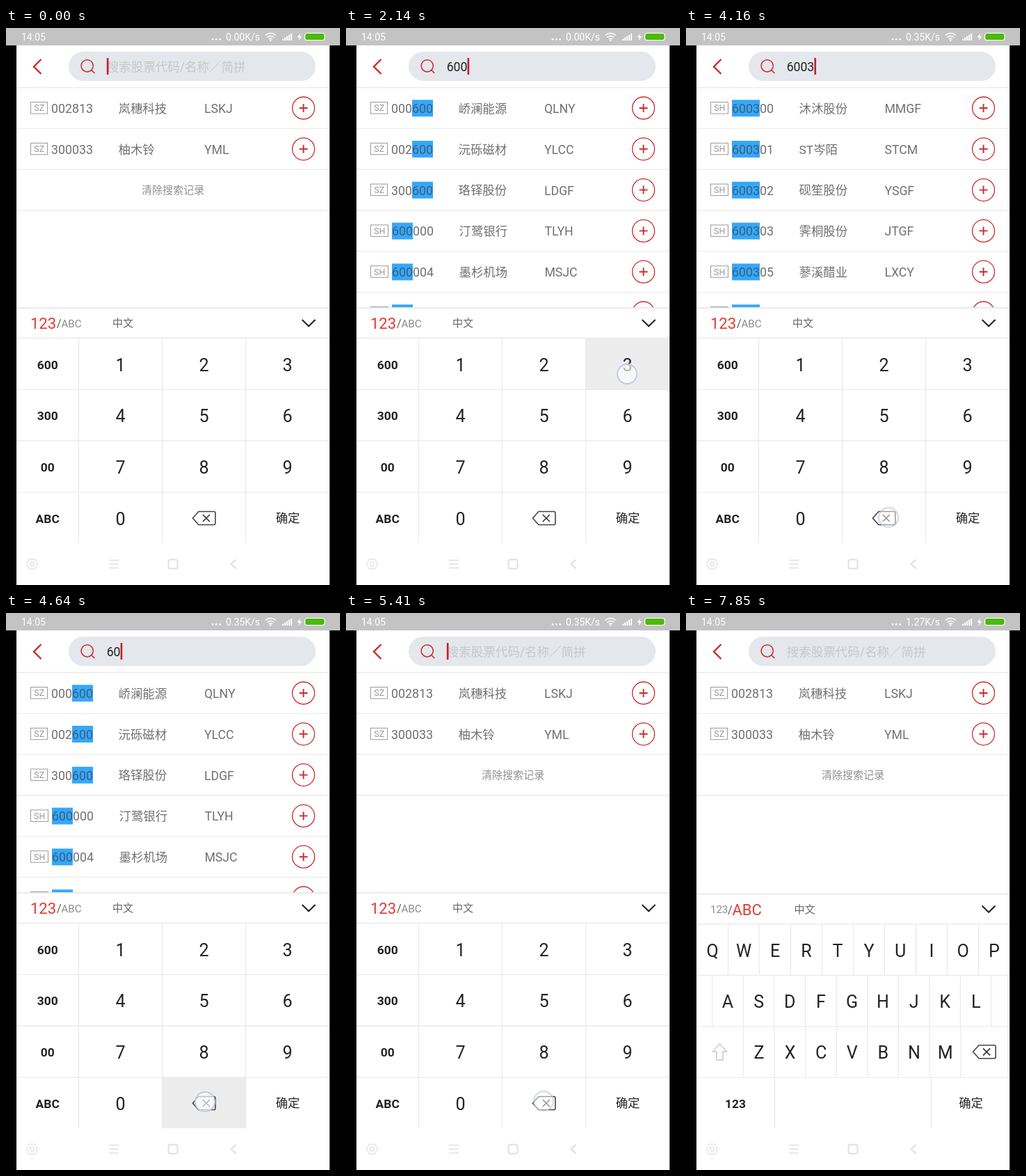
An HTML page for the animation above (8000 ms loop, 480 by 800 pixels).

```html
<!DOCTYPE html>
<html lang="zh-CN">
<head>
<meta charset="utf-8">
<title>Stock search keyboard</title>
<style>
  html, body { margin: 0; width: 100%; height: 100%; overflow: hidden; background: #000; }
  svg { display: block; width: 480px; height: 800px; font-family: Roboto, "Noto Sans CJK SC", "Noto Sans CJK", sans-serif; }
</style>
</head>
<body>
<svg id="stage" viewBox="0 0 480 800"></svg>
<script>
const LOOP = 8000, RED = '#cb2b2b', ROW = 58.8;

// x, vertical centre, string, size, colour, anchor, weight
const text = (x, y, s, size, fill = '#222', anchor = 'middle', weight = 400, id = '') =>
  `<text ${id && `id="${id}"`} x="${x}" y="${y + size * 0.36}" font-size="${size}" fill="${fill}" text-anchor="${anchor}" font-weight="${weight}">${s}</text>`;
const rect = (x, y, w, h, fill, extra = '') =>
  `<rect x="${x}" y="${y}" width="${w}" height="${h}" fill="${fill}" ${extra}/>`;
const path = (d, stroke, width = 1.5, fill = 'none') =>
  `<path d="${d}" stroke="${stroke}" stroke-width="${width}" fill="${fill}"/>`;
const ring = (x, y, r, stroke, width = 1.5, fill = 'none') =>
  `<circle cx="${x}" cy="${y}" r="${r}" stroke="${stroke}" stroke-width="${width}" fill="${fill}"/>`;
const group = (id, body) => `<g id="${id}">${body}</g>`;
const hline = (y, w = 1.3) => path(`M15 ${y}H465`, '#ebebeb', w);
const vlines = (xs, y, h) => xs.map(x => path(`M${x} ${y}v${h}`, '#ebebeb', 1.3)).join('');
const steps = (n, start, gap) => Array.from({ length: n }, (_, i) => start + i * gap);

function stockRow([market, code, name, abbr], i, query) {
  const y = 115.2 + i * ROW, sh = market === 'SH' ? 1 : 0, x = 65 + sh;
  const at = query ? code.indexOf(query) : -1;
  const mark = at < 0 ? '' : rect(x + at * 10, y - 12, query.length * 10, 24, '#35a8fa');
  const digits = at < 0 ? code :
    `${code.slice(0, at)}<tspan fill="#3f5f78">${query}</tspan>${code.slice(at + query.length)}`;
  return rect(35.5, y - 8.7, 24 + sh, 16.5, 'none', 'stroke="#999"') +
    text(47.7 + sh / 2, y - 0.3, market, 12.5, '#999') + mark +
    text(x, y + 0.4, digits, 17.8, '#707070', 'start') +
    text(161.5 + sh, y + 0.4, name, 17.4, '#707070', 'start') +
    text(285 + sh / 2, y + 0.4, abbr, 17.6, '#707070', 'start') +
    ring(427.5, y - 0.2, 16, RED, 1.3) +
    path(`M421.5 ${y - 0.2}h12m-6 -6v12`, RED, 1.9) + hline(y + 29.2);
}
const stockList = (id, query, rows) => group(id, rows.map((r, i) => stockRow(r, i, query)).join(''));

const eraseIcon = (x, y) =>
  path(`M${x - 16.5} ${y}l8.5 -9.5h22q2 0 2 2v15q0 2 -2 2h-22z`, '#444', 1.6) +
  path(`M${x - 2} ${y - 5}l10 10m0 -10l-10 10`, '#333', 1.7);

function modeBar(y, letters) {
  const [numSize, abcSize] = letters ? [15, 22] : [22, 15];
  const color = on => on ? '#e23a31' : '#8a8a8a';
  const slash = letters ? 60 : 73;
  return rect(15, y - 22, 450, 360, '#fff') + hline(y - 22, 2) + hline(y + 21.5) +
    text(35, y + 0.5, '123', numSize, color(!letters), 'start') +
    text(slash, y + 0.5, '/', 16, '#555', 'start') +
    text(letters ? 66.5 : 79.5, y + 0.5, 'ABC', abcSize, color(letters), 'start') +
    text(letters ? 170.5 : 168, y, '中文', 15, '#666') +
    path(`M425.5 ${y - 5}l9.5 9.3l9.5 -9.3`, '#222', 2);
}

function numberPad() {
  const keys = steps(9, 1, 1).map(n => text(164.5 + (n - 1) % 3 * 120, 483.5 + Math.floor((n - 1) / 3) * 73.7, n, 25));
  const side = ['600', '300', '00', 'ABC'].map((s, i) => text(59.7, 483.5 + i * 73.7, s, 17.4, '#222', 'middle', 700));
  return modeBar(424, false) + rect(0, 0, 0, 73, '#ececec', 'id="press"') +
    [519.3, 593, 666.8].map(y => hline(y)).join('') +
    vlines([104.5, 224.5, 344.5], 446, 294) + keys.join('') + side.join('') +
    text(164.5, 704.6, '0', 25) + eraseIcon(284.8, 704) +
    text(405, 704.2, '确定', 17.3, '#222', 'middle', 500);
}

function letterPad() {
  const letters = (s, x, gap, y) => [...s].map((c, i) => text(x + i * gap, y, c, 25)).join('');
  return modeBar(425.5, true) + [520.3, 593.7, 667.2].map(y => hline(y)).join('') +
    vlines(steps(9, 60.5, 45), 447, 73) + vlines([...steps(10, 37.6, 44.6), 463], 520.5, 73) +
    vlines([...steps(8, 82.4, 44.6), 463], 594, 73) + vlines([127.5, 352.5], 667, 73) +
    letters('QWERTYUIOP', 38, 45, 484.7) + letters('ASDFGHJKL', 60, 44.6, 558) +
    letters('ZXCVBNM', 105, 44.6, 631.3) +
    path('M48.5 618.5l-10 11.5h5.5v12h9v-12h5.5z', '#c8c8c8', 1.4) + eraseIcon(429, 630.3) +
    text(71, 704.5, '123', 17.4, '#222', 'middle', 700) +
    text(409.5, 704.2, '确定', 17.3, '#222', 'middle', 500);
}

const statusBar = rect(0, 0, 480, 25, '#c3c3c3') +
  text(22, 13, '14:05', 14, '#fff', 'start') +
  [297, 302.2, 307.4].map(x => `<circle cx="${x}" cy="16.3" r="1.4" fill="#fff"/>`).join('') +
  text(365, 13, '', 14, '#fff', 'end', 400, 'speed') +
  path('M372.5 10.5q7.7 -6 15.4 0M375 13.5q5.2 -4 10.4 0M377.6 16q2.6 -2 5.2 0', '#fff', 1.5) +
  '<circle cx="380.2" cy="17.7" r="1.2" fill="#fff"/>' +
  steps(5, 0, 1).map(i => rect(397 + i * 3, 15.5 - i * 1.9, 2, 2.5 + i * 1.9, '#fff')).join('') +
  '<path d="M423 7.5l-4.5 6h3l-1 5l4.500 -6.500h-3z" fill="#fff"/>' +
  rect(429.500, 7.500, 28.5, 10, '#4cb90b', 'rx="3" stroke="#fff" stroke-width="1.2"');

const header = path('M50.5 45L40 55.500L50.5 66', RED, 2.4) +
  rect(90, 34, 355, 42, '#e4e7eb', 'rx="21"') +
  ring(116.7, 54.3, 8.600, RED, 1.5) + path('M122.800 60.500l4.500 4.500', RED, 1.6) +
  text(144.7, 55.500, '搜索股票代码/名称／简拼', 17.5, '#c6c8cc', 'start', 400, 'hint') +
  text(144.7, 55.800, '', 17.6, '#222', 'start', 400, 'typed') +
  rect(0, 43, 2.6, 24, '#c3202c', 'id="caret"') + hline(85.5);

const navBar = rect(15, 740, 450, 60, '#fff') +
  path('M33.500 763h8l4 7l-4 7h-8l-4 -7z', '#e3e3e3', 1.3) + ring(37.5, 770, 3, '#e3e3e3', 1.3) +
  path('M148 764.500h14m-14 5.500h14m-14 5.500h14', '#e0e0e0', 1.5) +
  rect(233.500, 763.500, 13, 13, 'none', 'rx="2.5" stroke="#e0e0e0" stroke-width="2"') +
  path('M330.500 763.500l-7 6.500l7 6.500', '#dedede', 2);

document.getElementById('stage').innerHTML = rect(15, 25, 450, 775, '#fff') +
  group('history',
    [['SZ', '002813', '岚穗科技', 'LSKJ'], ['SZ', '300033', '柚木铃', 'YML']].map((r, i) => stockRow(r, i)).join('') +
    text(240, 233, '清除搜索记录', 15, '#909090') + hline(262, 1.6)) +
  stockList('list600', '600', [
    ['SZ', '000600', '峤澜能源', 'QLNY'], ['SZ', '002600', '沅砾磁材', 'YLCC'],
    ['SZ', '300600', '珞铎股份', 'LDGF'], ['SH', '600000', '汀鹭银行', 'TLYH'],
    ['SH', '600004', '墨杉机场', 'MSJC'], ['SH', '600006', '', '']]) +
  stockList('list6003', '6003', [
    ['SH', '600300', '沐沐股份', 'MMGF'], ['SH', '600301', 'ST岑陌', 'STCM'],
    ['SH', '600302', '砚笙股份', 'YSGF'], ['SH', '600303', '霁桐股份', 'JTGF'],
    ['SH', '600305', '蓼溪醋业', 'LXCY'], ['SH', '600306', '', '']]) +
  group('numbers', numberPad()) + group('letters', letterPad()) +
  navBar + header + statusBar +
  `<g id="touch">${ring(0, 0, 14, '#c3cae4', 2, 'rgba(255,255,255,.65)')}</g>`;

// Timelines: [start, value]
const typed = [[0, ''], [1370, '600'], [2200, '6003'], [2550, '60032'], [4040, '6003'],
  [4340, '600'], [4600, '60'], [4930, '6'], [5230, '']];
const lists = [[0, 'history'], [1430, 'list600'], [2380, 'list6003'], [4460, 'list600'], [5290, 'history']];
const speeds = [[0, '0.00K/s'], [3090, '0.35K/s'], [7130, '1.27K/s']];
const carets = [[0, 1], [180, 0], [710, 1], [1250, 0], [1780, 1], [3090, 0], [3630, 1],
  [5770, 0], [6300, 1], [6840, 0], [7310, 1], [7850, 0]];
const pads = [[0, 'numbers'], [6240, 'letters']];

// Touches: start, release, end, x, y, pressed key [x, y, width]
const ERASE = [225, 667, 120];
const touches = [
  [1070, 1340, 1490, 64, 490, [15, 446, 89]],
  [2080, 2260, 2430, 404, 497, [345, 446, 120]],
  [2430, 2610, 2850, 285, 499, [225, 446, 120]],
  [3920, 4100, 4220, 291, 703, ERASE],
  [4220, 4400, 4490, 288, 702, ERASE],
  [4490, 4680, 4830, 286, 702, ERASE],
  [4830, 5010, 5170, 285, 702, ERASE],
  [5170, 5350, 5590, 284, 701, ERASE],
  [6060, 6240, 6480, 95, 435, null]
];

const $ = id => document.getElementById(id);
const at = (line, t) => line.findLast(([start]) => start <= t)[1];
const show = (id, on) => $(id).setAttribute('visibility', on ? 'visible' : 'hidden');
const put = (id, s) => { if ($(id).textContent !== s) $(id).textContent = s; };

function draw(t) {
  const word = at(typed, t), list = at(lists, t), pad = at(pads, t);
  put('typed', word);
  put('speed', at(speeds, t));
  show('hint', !word);
  show('caret', at(carets, t));
  $('caret').setAttribute('x', 144.8 + word.length * 9.9);
  for (const id of ['history', 'list600', 'list6003']) show(id, id === list);
  for (const id of ['numbers', 'letters']) $(id).setAttribute('display', id === pad ? 'inline' : 'none');

  const touch = touches.find(([start, , end]) => t >= start && t < end);
  show('touch', touch);
  let key = null;
  if (touch) {
    const [start, release, , x, y, area] = touch;
    $('touch').setAttribute('transform', `translate(${x} ${y})`);
    $('touch').setAttribute('opacity', Math.min(1, 1 - (t - release) / 240));
    if (t >= start + 60 && t < release) key = area;
  }
  $('press').setAttribute('width', key ? key[2] : 0);
  if (key) {
    $('press').setAttribute('x', key[0]);
    $('press').setAttribute('y', key[1]);
  }
}

const begin = performance.now();
function tick() {
  draw((performance.now() - begin) % LOOP);
  requestAnimationFrame(tick);
}
tick();
</script>
</body>
</html>
```
